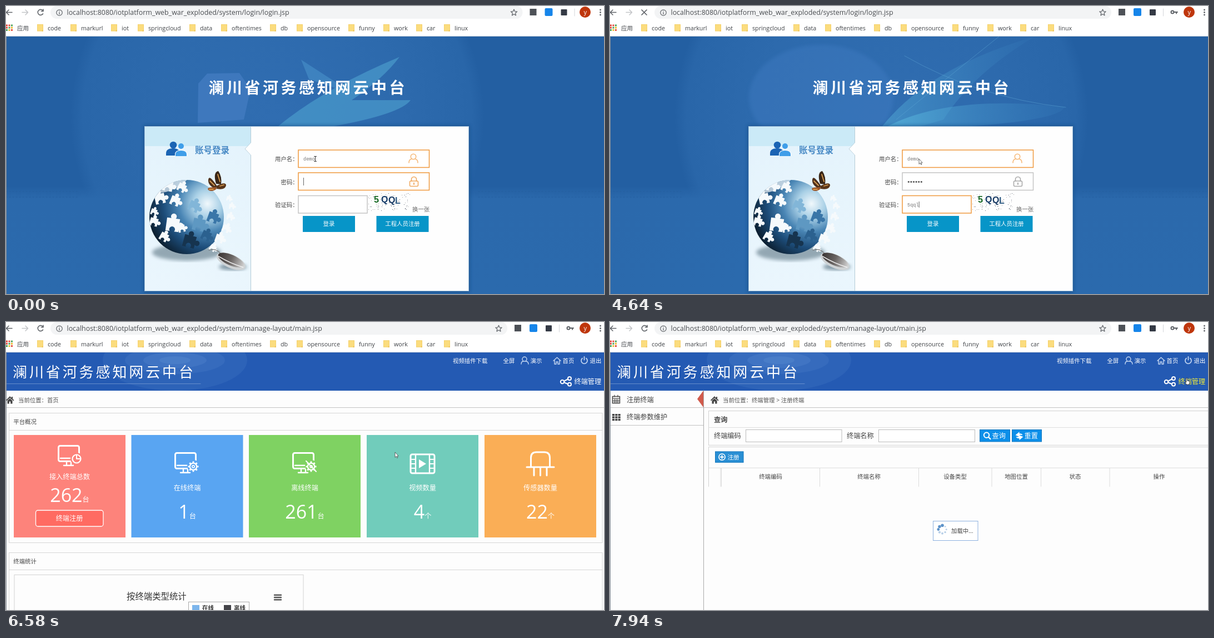
Recreate the animation shown at these times as an HTML page. Size 1076 by 520 pixels, loop 8000 ms.

```html
<!DOCTYPE html>
<html lang="zh">
<head>
<meta charset="utf-8">
<style>
html, body { margin: 0; width: 100%; height: 100%; overflow: hidden; background: #fff; }
svg { display: block; width: 1076px; height: 520px; font-family: "Open Sans", "Noto Sans CJK SC", "Noto Sans CJK", sans-serif; }
.mono { font-family: "Liberation Mono", monospace; }
.bold { font-weight: 700; }
.mid { text-anchor: middle; }
.line { fill: none; stroke-linecap: round; stroke-linejoin: round; }
</style>
</head>
<body>
<svg id="stage" viewBox="0 0 1076 520"></svg>
<script>
const LOOP = 8000;
const T = { typing: 270, captcha: 1960, submit: 4640, main: 4790, cards: 4920, data: 5060, chart: 5340, terminal: 7670, table: 7940 };

const text = (x, y, s, size = 10.4, fill = '#444', cls = '', more = '') =>
  `<text x="${x}" y="${y}" font-size="${size}" fill="${fill}" class="${cls}" ${more}>${s}</text>`;
const mid = (x, y, s, size, fill, cls = '') => text(x, y, s, size, fill, 'mid ' + cls);
const rect = (x, y, w, h, fill = 'none', stroke = 'none', more = '') =>
  `<rect x="${x}" y="${y}" width="${w}" height="${h}" fill="${fill}" stroke="${stroke}" ${more}/>`;
const circle = (x, y, r, fill, stroke = 'none', sw = 1) =>
  `<circle cx="${x}" cy="${y}" r="${r}" fill="${fill}" stroke="${stroke}" stroke-width="${sw}"/>`;
const oval = (x, y, rx, ry, fill, more = '') => `<ellipse cx="${x}" cy="${y}" rx="${rx}" ry="${ry}" fill="${fill}" ${more}/>`;
const shape = (d, fill, more = '') => `<path d="${d}" fill="${fill}" ${more}/>`;
const line = (d, stroke, sw = 1, more = '') => `<path class="line" d="${d}" stroke="${stroke}" stroke-width="${sw}" ${more}/>`;
const at = (x, y, body, more = '') => `<g transform="translate(${x} ${y}) ${more}">${body}</g>`;
const when = (from, to, body) => `<g data-from="${from}" data-to="${to}">${body}</g>`;
const range = n => [...Array(n).keys()];
let seed = 7;
const random = () => (seed = seed * 16807 % 2147483647) / 2147483647;

const defs = `<defs>
  <radialGradient id="sky" gradientUnits="userSpaceOnUse" cx="488" cy="200" r="372">
    <stop offset="0" stop-color="#306db1"/><stop offset=".6" stop-color="#2d6aad"/>
    <stop offset=".94" stop-color="#2966a9"/><stop offset="1" stop-color="#235fa2"/></radialGradient>
  <radialGradient id="globe" cx=".78" cy=".32" r=".85"><stop offset="0" stop-color="#f0f8fc"/>
    <stop offset=".22" stop-color="#a9d0e6"/><stop offset=".45" stop-color="#4a86b5"/>
    <stop offset=".7" stop-color="#1d4d7a"/><stop offset="1" stop-color="#0a1a28"/></radialGradient>
  <linearGradient id="floor" x2="0" y2="1"><stop offset="0" stop-color="#2b69ac" stop-opacity="0"/>
    <stop offset=".12" stop-color="#2b69ac"/><stop offset="1" stop-color="#2b6aad"/></linearGradient>
  <linearGradient id="wing"><stop offset="0" stop-color="#59b6dc" stop-opacity=".65"/>
    <stop offset="1" stop-color="#3b86c4" stop-opacity=".15"/></linearGradient>
  <linearGradient id="pane" x2="0" y2="1"><stop offset="0" stop-color="#e4f3fc"/><stop offset="1" stop-color="#eaf6fd"/></linearGradient>
  <linearGradient id="metal" x2="1" y2="0"><stop offset="0" stop-color="#3a3433"/>
    <stop offset=".5" stop-color="#6b6664"/><stop offset="1" stop-color="#d0d0d0"/></linearGradient>
  <clipPath id="ball"><circle cx="325" cy="381" r="67"/></clipPath>
  <filter id="soft"><feGaussianBlur stdDeviation="3"/></filter>
</defs>`;

// Browser bar
const folders = { code: 56, markurl: 116, iot: 189, springcloud: 237, data: 330, oftentimes: 387, db: 475,
  opensource: 523, funny: 616, work: 679, car: 738, linux: 788 };
const folder = x => rect(x, 33, 11, 12.5, '#fbdc7e') + shape(`M${x + 11} 42.5v3h-3z`, '#e3b040') +
  rect(x + .5, 33.5, 10, 11.5, 'none', '#f3cf68', 'stroke-width=".8"');
const url = 'localhost:8080/iotplatform_web_war_exploded/system/';
const star = range(10).map(i => {
  const r = i % 2 ? 2.7 : 6, a = i * Math.PI / 5 - Math.PI / 2;
  return `${i ? 'L' : 'M'}${(r * Math.cos(a)).toFixed(1)} ${(r * Math.sin(a)).toFixed(1)}`;
}).join('') + 'z';
const reload = line('M66 8a5 5 0 1 0 .5 6M67 6v3.5h-3.5', '#5f6368', 1.6);
const stop = line('M57 7l9 9M66 7l-9 9', '#5f6368', 1.7);

const bar = rect(0, 0, 1076, 55, '#fff') + '<path id="pill" fill="#f3f4f5"/>' +
  line('M11 11.5H1M5 7l-4.5 4.5L5 16', '#5f6368', 1.5) + line('M29 11.5h10M35 7l4.5 4.5L35 16', '#c3c5c8', 1.5) +
  when(0, T.submit, reload) + when(T.submit, T.data, stop) + when(T.data, LOOP, reload) +
  circle(96, 12, 5.2, 'none', '#5f6368', 1.2) + line('M96 11.5v3M96 9.2v.1', '#5f6368', 1.3) +
  when(0, T.main, text(109.5, 16, url + 'login/login.jsp', 12.4, '#4a4d51')) +
  when(T.main, LOOP, text(109.5, 16, url + 'manage-layout/main.jsp', 12.4, '#4a4d51')) +
  `<g id="tools">${at(886.5, 12, line(star, '#5f6368', 1.2)) + rect(915, 5, 12, 12, '#4d5157') +
    rect(942, 4, 14, 14, '#1685ea', 'none', 'rx="2"') + rect(971, 6, 11, 11, '#343a45', 'none', 'rx="1"') +
    line('M995.5 5v13', '#d4d6d9')}</g>` +
  `<g id="key">${circle(1012, 11, 2.5, 'none', '#5f6368', 2) + line('M1015 11h6M1019 11v2.5', '#5f6368', 2)}</g>` +
  circle(1042, 11, 10, '#bf360c') + mid(1042.3, 14.5, 'y', 11, '#fff') +
  [7, 11.5, 16].map(y => circle(1069.5, y, 1.4, '#5f6368')).join('') +
  range(9).map(i => rect(i % 3 * 4.5, 33.5 + (i / 3 | 0) * 4.2, 3, 3, ['#e34b3f', '#4aa45b', '#efb92c'][Math.max(0, (i / 3 | 0) + i % 3 - 1) % 3])).join('') +
  text(20, 43.5, '应用', 10.5, '#45484c') +
  Object.entries(folders).map(([name, x]) => folder(x) + text(x + 19, 43.5, name, 10.7, '#3f4246')).join('') +
  rect(0, 54, 1076, 1, '#d8dde3');

// Login page
const piece = (x, y, turn, size = 1, fill = '#f6fafc') => at(x, y,
  shape('M-9-9H-3a4 4 0 1 1 6 0H9V-3a4 4 0 1 1 0 6V9H3a4 4 0 1 0-6 0H-9z', fill), `rotate(${turn}) scale(${size})`);
const whitePieces = [[291, 325, 10], [277, 348, -12], [304, 352, 22, .9], [316, 328, 30, .8], [300, 395, 8, 1.3],
  [266, 390, 15, .8], [284, 417, 30, .8], [316, 402, -12, .7], [266, 372, 20, .6]];
const loosePieces = [[401, 348, 15, .45], [406, 362, 6, .5], [403, 381, 15, .6], [396, 402, 30, .7], [384, 420, 20, .8], [372, 437, 35, .6]];
const globe = oval(325, 445, 62, 15, '#6f8794', 'opacity=".7" filter="url(#soft)"') + circle(325, 381, 67, 'url(#globe)') +
  `<g clip-path="url(#ball)">${piece(347, 395, 12, 1.2, '#5e98c2') + piece(372, 382, 20, 1, '#3a76a8') + piece(338, 362, 25, 1, '#82b6d8') +
    piece(330, 425, 15, 1.2, '#16344f') + piece(360, 415, 25, .9, '#2b618f') + whitePieces.map(p => piece(...p)).join('') +
    oval(300, 318, 34, 12, '#f4f9fc', 'transform="rotate(-28 300 318)" opacity=".7"')}</g>` +
  loosePieces.map(p => piece(...p)).join('');
const butterfly = shape('M378 321Q372 300 382 298Q389 308 387 322z', '#3a2718') + shape('M379 324Q365 303 364 314Q363 324 378 331z', '#4d301c') +
  shape('M378 325Q396 316 396 324Q394 333 379 330z', '#593519') + shape('M377 327Q358 327 365 333Q372 336 379 330z', '#9a5526') +
  line('M381 304l4 13M367 316l8 8M385 325l7-2M366 331h7', '#d69b4f', 1.8);
const mouse = line('M365 441Q378 436 387 448', '#777', 1.2) + oval(408, 471, 25, 6, '#8298a5', 'filter="url(#soft)"') +
  at(405, 461, oval(0, 0, 28, 12, '#cfd3d5') + oval(-1, -2, 25, 9.5, 'url(#metal)') + line('M-24 1Q0 4 24 1', '#f2f2f2', 1.6), 'rotate(24)');
const people = shape('M288 270v-4q0-9 13-9q8 0 11 5v8z', '#1b64b4') + circle(301, 251, 6.3, '#1b64b4') +
  shape('M304 271v-3q0-8 11-8t11 8v3z', '#fff') + shape('M305 271v-3q0-7 10-7t10 7v3z', '#3f9ee9') + circle(315, 253, 5, '#3f9ee9');
const field = (y, w, focus) => rect(526, y, w, 31.5, '#fff', focus ? '#ef993e' : '#c4c4c4', 'stroke-width="1.5"');
const lock = c => line('M729.5 316v-3a4.5 4.5 0 0 1 9 0v3', c, 1.7) + rect(726.5, 316, 15, 9.5, 'none', c, 'stroke-width="1.6" rx="2"') + line('M734 319.5v2.5', c, 2);
const button = (x, label) => rect(x, 379, 94, 29, '#0795c8') + mid(x + 47, 397, label, 10.4, '#fff');
const speckles = range(85).map(() => rect(652 + (random() * 75 | 0), 338 + (random() * 32 | 0), 1, 1, random() < .6 ? '#a4a4a4' : '#596271')).join('');

const backdrop = rect(0, 55, 1076, 465, 'url(#sky)') + rect(0, 325, 1076, 195, 'url(#floor)') +
  line('M0 335H130M0 345H130M850 335H1076M850 345H1076', '#25609f', 1.5, 'stroke-dasharray="2 4" opacity=".6"') +
  when(0, T.submit, shape('M346 140L362 122L420 121L440 150L428 205L345 211z', '#437dc2', 'opacity=".75"')) +
  when(T.submit, T.main, oval(380, 165, 130, 95, '#4480c7', 'opacity=".35" filter="url(#soft)"')) +
  when(0, T.typing, shape('M490 217Q570 150 708 92Q680 130 622 170L728 170Q710 195 590 217z', '#4795c8', 'opacity=".8"') +
    shape('M531 97L628 160L545 132z', '#4991ca', 'opacity=".6"')) +
  when(T.typing, T.main, shape('M490 217Q575 110 765 55Q655 120 600 205L560 217z', 'url(#wing)', 'opacity=".7"') +
    shape('M500 217Q610 160 818 182Q812 205 650 217z', 'url(#wing)') +
    line('M515 205Q625 115 700 55M530 90Q660 165 820 183', '#63acd8', 1, 'opacity=".45"'));

const login = backdrop +
  text(364.5, 158, '澜川省河务感知网云中台', 28, '#fff', 'bold', 'letter-spacing="4.5"') +
  rect(248, 216, 586, 301, '#174a82', 'none', 'opacity=".75" filter="url(#soft)"') +
  rect(249.5, 217.5, 583, 297, '#fefefe', '#a9c5dd') + rect(250, 218, 190, 296, 'url(#pane)') + rect(250, 218, 190, 35, '#cbeaf7') +
  line('M440.5 218V247L430 258L440.5 269V514', '#b5cbd6') + shape('M441 247L430.5 258L441 269z', '#fff') +
  people + text(340, 265.5, '账号登录', 15.5, '#4588c4', 'bold') + globe + butterfly + mouse +
  text(484, 280, '用户名：') + text(494.5, 321.5, '密码：') + text(484, 362.5, '验证码：') +
  field(260, 235.5, true) + text(535, 279, 'demo', 8.6, '#777', 'mono') +
  circle(733, 272, 4.7, 'none', '#f6b877', 1.6) + line('M725 283q0-6 5-7M736 276q5 1 5 7', '#f6b877', 1.6) +
  when(0, T.captcha, field(301, 235.5, true) + lock('#f0aa62') + field(342.5, 124, false)) +
  when(T.captcha, T.main, field(301, 235.5, false) + lock('#aaa') + field(342.5, 124, true)) +
  [270, 430, 730, 980, 1410, 1530].map((t, i) => when(t, T.main, circle(537.3 + i * 4.6, 317.5, 1.6, '#555'))).join('') +
  text(535, 361.5, '', 8.6, '#777', 'mono', 'id="code"') + `<path id="caret" stroke="#666"/>` + speckles +
  `<g font-family="Liberation Sans,sans-serif" font-size="16" class="bold"><text x="662" y="355" fill="#176a24">5</text>
   <text x="675" y="355" fill="#153b68">Q</text><text x="688" y="356" fill="#183a64">Q</text><text x="700" y="357" fill="#315d85">L</text></g>` +
  text(731, 371, '换一张', 10.4, '#666') + button(534, '登录') + button(666.5, '工程人员注册');

// Main page
const home = (x, y) => at(x, y, shape('M0 7L7 0L10 3V1h2v4l2.5 2l-1 1.5L7 3L1 8.5z', '#444') + shape('M2.5 8L7 4l4.5 4v5.5H8.2V9.5H5.8v4H2.5z', '#444'));
const gear = range(8).map(i => `<path d="M0-7V-10" stroke="#fff" stroke-width="3" transform="rotate(${i * 45})"/>`).join('') +
  circle(0, 0, 6.5, 'none', '#fff', 2.4) + circle(0, 0, 2.3, 'none', '#fff', 1.8);
const monitor = (x, y, fill, badge) => at(x, y, rect(1.5, 1.5, 37, 28, 'none', '#fff', 'stroke-width="3" rx="3"') +
  line('M5 24h24M16 30v6M24 30v6M11 37h17', '#fff', 2.4) + circle(34, 25, 11, fill) + at(34, 25, badge));
const pie = circle(0, 0, 7.5, 'none', '#fff', 2.2) + line('M0-7V0H7', '#fff', 2);
const film = rect(728, 239, 43, 34, 'none', '#fff', 'stroke-width="3" rx="3"') + line('M737 239v34M762 239v34', '#fff', 2.4) +
  line('M730 248h6M730 256h6M730 264h6M763 248h6M763 256h6M763 264h6', '#fff', 2) + shape('M743 248v16l13-8z', '#fff');
const sensor = line('M944.5 261v-16q0-10 10-10h14q10 0 10 10v16M937 262h49M950 263v14M961.5 263v14M973 263v14', '#fff', 3);
const cards = [
  [14, '#fd837b', '接入终端总数', 262, '台', monitor(93, 222, '#fd837b', pie)],
  [225.5, '#59a5f2', '在线终端', 1, '台', monitor(303, 235, '#59a5f2', at(0, 1, gear, 'scale(.95)'))],
  [437, '#7fd262', '离线终端', 261, '台', monitor(515, 235, '#7fd262', at(0, 1, gear, 'scale(.95)') + line('M-9-9L9 10', '#fff', 2))],
  [649, '#71ccbb', '视频数量', 4, '个', film],
  [861, '#faae56', '传感器数量', 22, '个', sensor],
];
const register = y => rect(53.5, y, 121.5, 29, '#ff6b62', '#fff', 'rx="4" stroke-width="1.3"') + mid(114, y + 19, '终端注册', 12.2, '#fff');
const card = ([x, fill, label, count, unit, icon], i) => {
  const cx = x + 100.5, drop = i ? 0 : -20;
  return rect(x, 204, 201, 185, fill) + icon + mid(cx, 303.5 + drop, label, 12.2, '#fff') +
    when(T.cards, T.data, mid(cx, i ? 338 : 305, unit, 12.2, '#fff')) +
    when(T.data, LOOP, mid(cx, i ? 354.5 : 324.5, `${count}<tspan font-size="12.2">${unit}</tspan>`, 34, '#fff'));
};
const panel = (y, h, title) => rect(5.5, y, 1067.5, h, 'none', '#d6d6d6') + line(`M5.5 ${y + 31}H1073`, '#d6d6d6') + text(13.3, y + 19.5, title);

const header = rect(0, 55, 1076, 69, '#245ab3') +
  `<svg x="0" y="55" width="1076" height="69">${[[130, 55, .07], [90, 25, .07], [57, 14, .09], [28, 7, .09]].map(([rx, ry, o]) => oval(304, 14, rx, ry, '#a9d0ff', `opacity="${o}"`)).join('')}</svg>` +
  line('M0 111.5H350', '#7fa2d6', 1, 'opacity=".7"') +
  text(12, 99.5, '澜川省河务感知网云中台', 26, '#fff', '', 'letter-spacing="3.9"') +
  [[804, '视频插件下载'], [894.5, '全屏'], [943.5, '演示'], [1001.5, '首页'], [1050.5, '退出']].map(([x, s]) => text(x, 74, s, 10.4, '#fff')).join('') +
  circle(933, 67, 4, 'none', '#c6d8f2', 1.4) + line('M927 76q0-5 4-5M935 71q5 0 5 5', '#c6d8f2', 1.4) +
  line('M985 70l6.5-6l6.5 6M987 69v7h3v-4h3v4h3v-7', '#c6d8f2', 1.4) + line('M1037 65.5a5.5 5.5 0 1 0 7 0M1040.5 62.5v6', '#c6d8f2', 1.7) +
  line('M1002 108l11-6M1002 108l11 5', '#fff', 2) + circle(1001, 108, 3.2, '#245ab3', '#fff', 2) +
  circle(1014, 102, 3, '#245ab3', '#fff', 2) + circle(1014, 112.5, 3, '#245ab3', '#fff', 2) +
  text(1022.5, 111.5, '终端管理', 12.2, '#fff', '', 'id="menu"');

const overview = home(0, 134) + text(22, 145, '当前位置：首页', 10.4, '#555') + line('M0 154.5H1076', '#c2c2c2') +
  when(T.cards, LOOP, panel(164.5, 234, '平台概况') + cards.map(card).join('') +
    when(T.cards, T.data, register(318.5)) + when(T.data, LOOP, register(340)) +
    panel(416.5, 120, '终端统计') + rect(15, 456.5, 520, 80, 'none', '#d2d2d2') +
    when(T.cards, T.chart, text(229, 492, '数据加载中。。。')) +
    when(T.chart, LOOP, text(217, 501, '按终端类型统计', 15.4, '#333') + line('M483 493h12M483 497.2h12M483 501.5h12', '#555', 2.4) +
      rect(328.5, 505.5, 109, 30, '#fff', '#aaa') + rect(335, 511, 13, 12, '#7cb5ec') + rect(392, 511, 13, 12, '#434348') +
      text(353, 520, '在线', 10.4, '#333', 'bold') + text(410, 520, '离线', 10.4, '#333', 'bold')));

// Terminal page
const action = (x, y, w, h, label, icon, fill = '#0c8fe9') => rect(x, y, w, h, fill, '#1377bd') + at(x + 13, y + h / 2, icon) + text(x + 22, y + h / 2 + 4.3, label, h > 21 ? 12.2 : 10.6, '#fff');
const lens = circle(-1, -1, 4.7, 'none', '#fff', 2) + line('M3 3l3 3', '#fff', 2.4);
const swap = shape('M-7-1L0-7V-4Q5-4 6-1Q1-2 0-1V2zM7 2L0 8V5Q-5 5-6 2Q-1 3 0 1V-1z', '#fff');
const plus = circle(-1, 0, 5.7, 'none', '#fff', 1.6) + line('M-4 0h6M-1-3v6', '#fff', 1.8);
const columns = [[289, '终端编码'], [466, '终端名称'], [621, '设备类型'], [731, '地图位置'], [837, '状态'], [988, '操作']];
const spinner = range(8).map(i => {
  const a = i * Math.PI / 4 - Math.PI / 2;
  return circle(598 + 7.2 * Math.cos(a), 374.5 + 7.2 * Math.sin(a), i ? 1.1 + i * .22 : 2.8, i > 5 || !i ? '#5c92c9' : '#b9d0e8');
}).join('');
const terminal = line('M0 154.5H1076M0 186.5H168', '#c2c2c2') + line('M168.5 124V520', '#aaa') +
  shape('M168 124L157 139L168 154z', '#d15b4c') +
  rect(4.5, 134.5, 13, 12, 'none', '#444', 'stroke-width="1.5"') + line('M5 138h12M8 132v3M14 132v3M8 139v7M11 139v7M14 139v7M5 142.5h12', '#444', 1.2) +
  range(9).map(i => rect(4 + i % 3 * 5.3, 166 + (i / 3 | 0) * 4.4, 4.2, 3.4, '#444')).join('') +
  text(30, 144.5, '注册终端', 12.2) + text(30, 176, '终端参数维护', 12.2) +
  home(181, 134) + text(203, 145, '当前位置：终端管理 &gt; 注册终端', 10.4, '#555') +
  when(T.table, LOOP, rect(177.5, 160.5, 910, 62, 'none', '#d2d2d2') + line('M178 190.5H1076M178 263.5H1076', '#dedede') +
    text(187, 181, '查询', 12.2, '#444', 'bold') + text(187, 210, '终端编码', 12.2) + text(426, 210, '终端名称', 12.2) +
    rect(244.5, 194.5, 172.5, 22, '#fff', '#bbb') + rect(483.5, 194.5, 173, 22, '#fff', '#bbb') +
    action(665.5, 194.5, 54, 21.5, '查询', lens) + action(723.5, 194.5, 53, 21.5, '重置', swap) +
    line('M177.5 297V225.5H1076', '#d2d2d2') + action(189.5, 234, 50.5, 19.5, '注册', plus, '#2a8fd4') +
    [199, 200.5, 377.5, 555.5, 687, 775.5, 899].map(x => line(`M${x} 264V297`, '#dcdcdc')).join('') +
    columns.map(([x, s]) => mid(x, 283, s, 10.4, '#444')).join('') +
    rect(581.5, 359.5, 80.5, 35, '#fff', '#8db1df') + spinner + text(614, 381, '加载中...'));

const pointers = {
  beam: line('M-2-4.5h2h2M0-4.5v9M-2 4.5h2h2', '#333', 1),
  arrow: shape('M0 0V9.5L2.2 7.4L3.7 10.6L5 10L3.6 7H6.2z', '#fff', 'stroke="#444" stroke-width=".8"'),
  hand: shape('M3 0q1 0 1 1v4l4 1v3l-1.5 3h-4L0 8l1-1l1 1V1q0-1 1-1z', '#fff', 'stroke="#222" stroke-width=".8"'),
  click: circle(5, 2, 5, 'none', '#8fa9d4') + shape('M3 1q1 0 1 1v4l4 1v3l-1.5 3h-4L0 9l1-1l1 1V2q0-1 1-1z', '#fff', 'stroke="#222" stroke-width=".8"'),
};
const moves = [[0, 556.5, 276, 'beam'], [T.submit, 556, 276, 'arrow'], [T.cards, 556.5, 276, 'beam'], [6580, 700, 235, 'arrow'],
  [6700, 890, 165, 'arrow'], [6820, 1007, 126, 'arrow'], [6970, 1067, 120, 'arrow'], [7130, 1048, 109, 'hand'],
  [7270, 1041, 101, 'hand'], [7390, 1035, 99, 'click'], [T.terminal, 1035, 101, 'hand']];
const toolShift = [[0, 27.5], [T.typing, 12], [430, 3], [580, 0]];
const typed = [[0, ''], [3200, '5'], [3780, '5q'], [3900, '5qq'], [4330, '5qql']];
const carets = [[0, 0], [270, 1], [430, 2], [730, 3], [980, 4], [1410, 5], [1530, 6], [T.captcha, 0], [2520, -1],
  [3080, 0], [3200, 1], [3630, -1], [3780, 2], [3900, 3], [4330, 4]];

const stage = document.getElementById('stage');
stage.innerHTML = defs + rect(0, 0, 1076, 520, '#fdfdfd') + bar + when(0, T.main, login) +
  when(T.main, LOOP, header + when(T.main, T.terminal, overview) + when(T.terminal, LOOP, terminal)) +
  line('M.5 55V520', '#8a929b') + Object.entries(pointers).map(([k, body]) => `<g id="${k}">${body}</g>`).join('');

const el = id => document.getElementById(id);
const timed = [...stage.querySelectorAll('[data-from]')].map(node => [node, +node.dataset.from, +node.dataset.to]);
const latest = (steps, t) => steps.findLast(step => step[0] <= t);
const show = (node, on) => { node.style.display = on ? '' : 'none'; };

function draw(t) {
  timed.forEach(([node, from, to]) => show(node, t >= from && t < to));
  const shift = latest(toolShift, t)[1];
  el('tools').setAttribute('transform', `translate(${shift} 0)`);
  el('pill').setAttribute('d', `M92 0H${891 + shift}a11 11.5 0 0 1 0 23H92a12 11.5 0 0 1 0-23z`);
  el('key').style.opacity = t < T.typing ? 0 : 1 - shift / 20;
  el('code').textContent = latest(typed, t)[1];
  const n = latest(carets, t)[1], inCode = t >= T.captcha;
  show(el('caret'), n >= 0);
  el('caret').setAttribute('d', `M${535.5 + n * (inCode ? 5.16 : 4.6)} ${inCode ? 353 : 310}v${inCode ? 11 : 14}`);
  el('menu').setAttribute('fill', t < T.terminal ? '#fff' : '#f4ed37');
  const [, x, y, kind] = latest(moves, t);
  Object.keys(pointers).forEach(k => show(el(k), k === kind));
  el(kind).setAttribute('transform', `translate(${x} ${y})`);
}

const start = performance.now();
function tick() {
  draw((performance.now() - start) % LOOP);
  requestAnimationFrame(tick);
}
tick();
</script>
</body>
</html>
```
